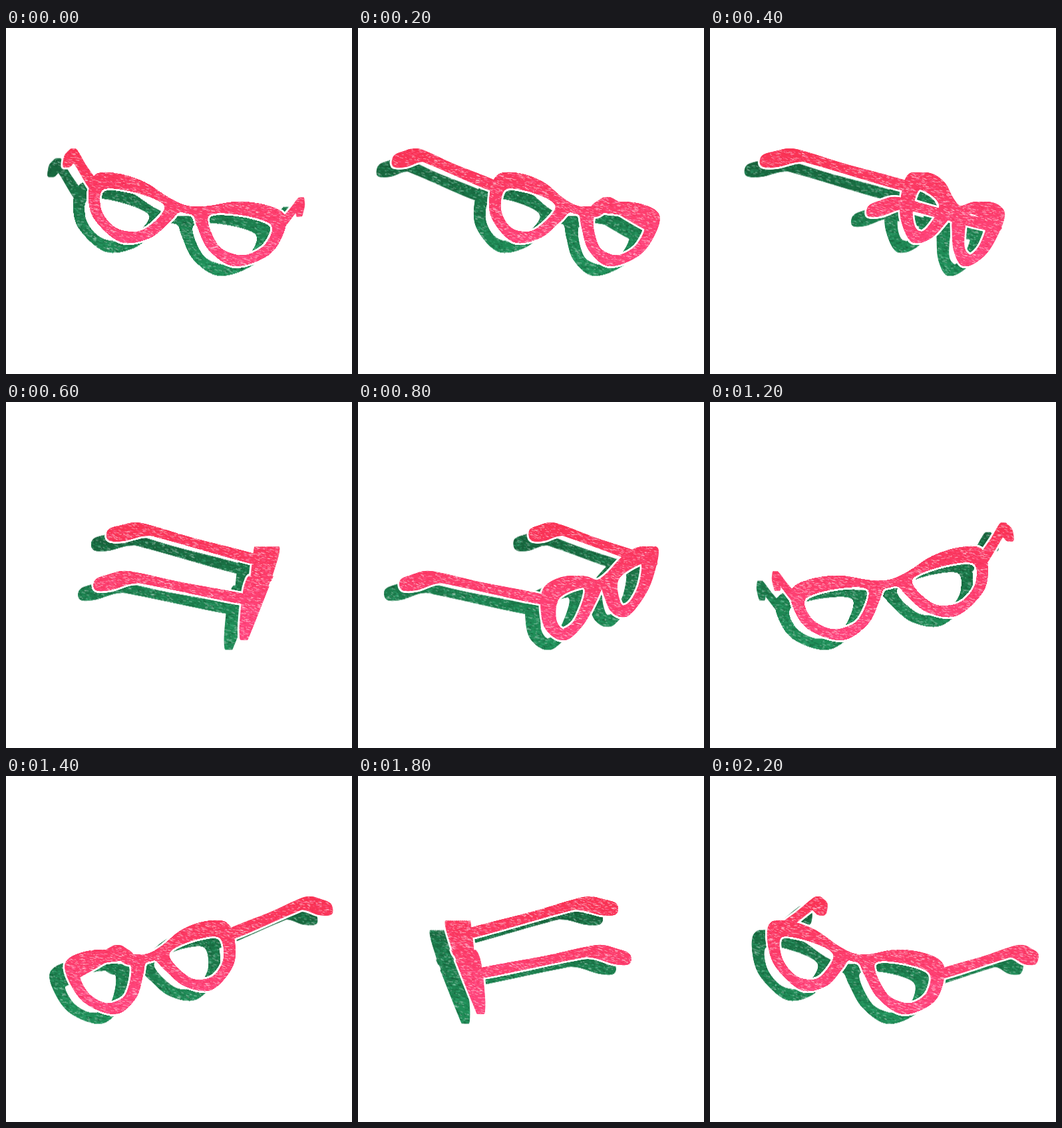
An HTML page with a canvas for the animation above (2300 ms loop, 520x520 px).

```html
<!DOCTYPE html>
<html lang="en">
<head>
<meta charset="utf-8">
<title>Turning glasses</title>
<style>
html, body { margin: 0; width: 100%; height: 100%; overflow: hidden; background: #fff; }
canvas { display: block; width: 520px; height: 520px; }
</style>
</head>
<body>
<canvas id="stage" width="520" height="520"></canvas>
<script>
const SIZE = 520, CX = 271, CY = 268;
const STEP = 100, FRAMES = 23, TURN = Math.PI / 12;
const ROLL = Math.PI / 15, PITCH = 0.26, FACE = 112;

const ctx = document.getElementById('stage').getContext('2d');
const sheet = document.createElement('canvas');
sheet.width = sheet.height = SIZE;
const ink = sheet.getContext('2d');

// Key points of one half, seen from the front (across, down) ...
const halfRim = [[0, 0], [30, -6], [70, -21], [112, -25], [144, -17], [149, 10], [134, 47], [88, 73], [46, 58], [22, 28], [12, 12], [0, 10]];
const hole = [[33, 8], [75, -4], [128, 1], [128, 30], [108, 51], [84, 57], [55, 47]];
// ... and of one arm, seen from the side (depth, down)
const arm = [[104, -4], [0, -1], [-55, -1], [-84, 1], [-104, 11], [-121, 23], [-117, 37], [-96, 32], [-66, 15], [-35, 12], [104, 9]];

// Glasses space to the tilted pose
function pose([u, v, w]) {
  const down = v * Math.cos(ROLL) + u * Math.sin(ROLL);
  return {
    x: u * Math.cos(ROLL) - v * Math.sin(ROLL) + 2,
    y: CY + down + PITCH * (w - FACE),
    z: w - PITCH * down,
    taper: 1 - v / 110
  };
}

const mirror = pts => pts.map(([u, v]) => [-u, v]);
const onFace = pts => pts.map(([u, v]) => pose([u, v, FACE - 5 * (u / 148) ** 2]));
const onSide = sign => arm.map(([w, v]) => pose([sign * (143 + (104 - w) * 0.17), v, w]));

const rim = halfRim.concat(mirror(halfRim.slice(1, -1)).reverse());
const front = [rim, [...hole].reverse(), mirror(hole)].map(onFace);
const sides = [-1, 1].map(onSide);

// Closed smooth curve through all points
function loop(path, pts) {
  const n = pts.length, at = i => pts[(i + n) % n];
  path.moveTo(...pts[0]);
  for (let i = 0; i < n; i++) {
    const [a, b, c, d] = [at(i - 1), at(i), at(i + 1), at(i + 2)];
    path.bezierCurveTo(
      b[0] + (c[0] - a[0]) / 6, b[1] + (c[1] - a[1]) / 6,
      c[0] - (d[0] - b[0]) / 6, c[1] - (d[1] - b[1]) / 6,
      c[0], c[1]);
  }
  path.closePath();
}

// Thin slices that together give the glasses their thickness
function slices(angle) {
  const cos = Math.cos(angle), sin = Math.sin(angle), list = [];
  const add = (loops, dx, dz) => {
    const path = new Path2D();
    for (const pts of loops) {
      loop(path, pts.map(p => [CX + (p.x + dx) * cos + (p.z + dz * p.taper) * sin, p.y]));
    }
    list.push(path);
  };
  const depth = 4 + 11 * sin ** 6;
  for (let i = -12; i <= 12; i++) add(front, 0, depth * i / 12);
  for (const side of sides) for (let d = -3; d <= 3; d += 2) add([side], d, 0);
  return list;
}

function random(seed) {
  let n = seed;
  return () => {
    n = (n + 0x6D2B79F5) | 0;
    let t = Math.imul(n ^ (n >>> 15), 1 | n);
    t = (t + Math.imul(t ^ (t >>> 7), 61 | t)) ^ t;
    return ((t ^ (t >>> 14)) >>> 0) / 4294967296;
  };
}

function trace(g, list, color, width) {
  g.fillStyle = g.strokeStyle = color;
  g.lineWidth = width;
  g.lineJoin = 'round';
  for (const p of list) { g.fill(p); g.stroke(p); }
}

// Pencil-shaded copy of the glasses
function shade(list, [top, bottom], grains, seed, dx, dy) {
  const rnd = random(seed);
  ink.globalCompositeOperation = 'source-over';
  ink.clearRect(0, 0, SIZE, SIZE);
  const fade = ink.createLinearGradient(0, 185, 0, 330);
  fade.addColorStop(0, top);
  fade.addColorStop(1, bottom);
  trace(ink, list, fade, 1);
  ink.globalCompositeOperation = 'source-atop';
  ink.lineWidth = 0.9;
  for (const [color, count] of grains) {
    ink.strokeStyle = color;
    ink.beginPath();
    for (let i = 0; i < count; i++) {
      const x = 30 + rnd() * 470, y = 175 + rnd() * 190, len = 1.5 + rnd() * 4;
      ink.moveTo(x, y);
      ink.lineTo(x + len, y + len * (rnd() * 0.5 - 0.05));
    }
    ink.stroke();
  }
  ctx.drawImage(sheet, dx, dy);
}

const green = ['#17643c', '#1f8e58'];
const greenGrains = [['rgba(15,75,45,.55)', 4500], ['rgba(60,185,130,.6)', 3500], ['rgba(255,255,255,.45)', 2200]];
const red = ['#fa3354', '#ff447c'];
const redGrains = [['rgba(238,35,75,.45)', 3500], ['rgba(255,125,180,.5)', 3500], ['rgba(255,255,255,.5)', 3800]];

function draw(frame) {
  const list = slices(frame * TURN);
  ctx.fillStyle = '#fff';
  ctx.fillRect(0, 0, SIZE, SIZE);
  shade(list, green, greenGrains, frame * 2 + 1, -23, 14.5);
  trace(ctx, list, '#fff', 6.5);
  shade(list, red, redGrains, frame * 2 + 2, 0, 0);
}

let shown = -1;
const start = performance.now();
function tick() {
  const frame = Math.floor((performance.now() - start) / STEP) % FRAMES;
  if (frame !== shown) draw(shown = frame);
  requestAnimationFrame(tick);
}
tick();
</script>
</body>
</html>
```
